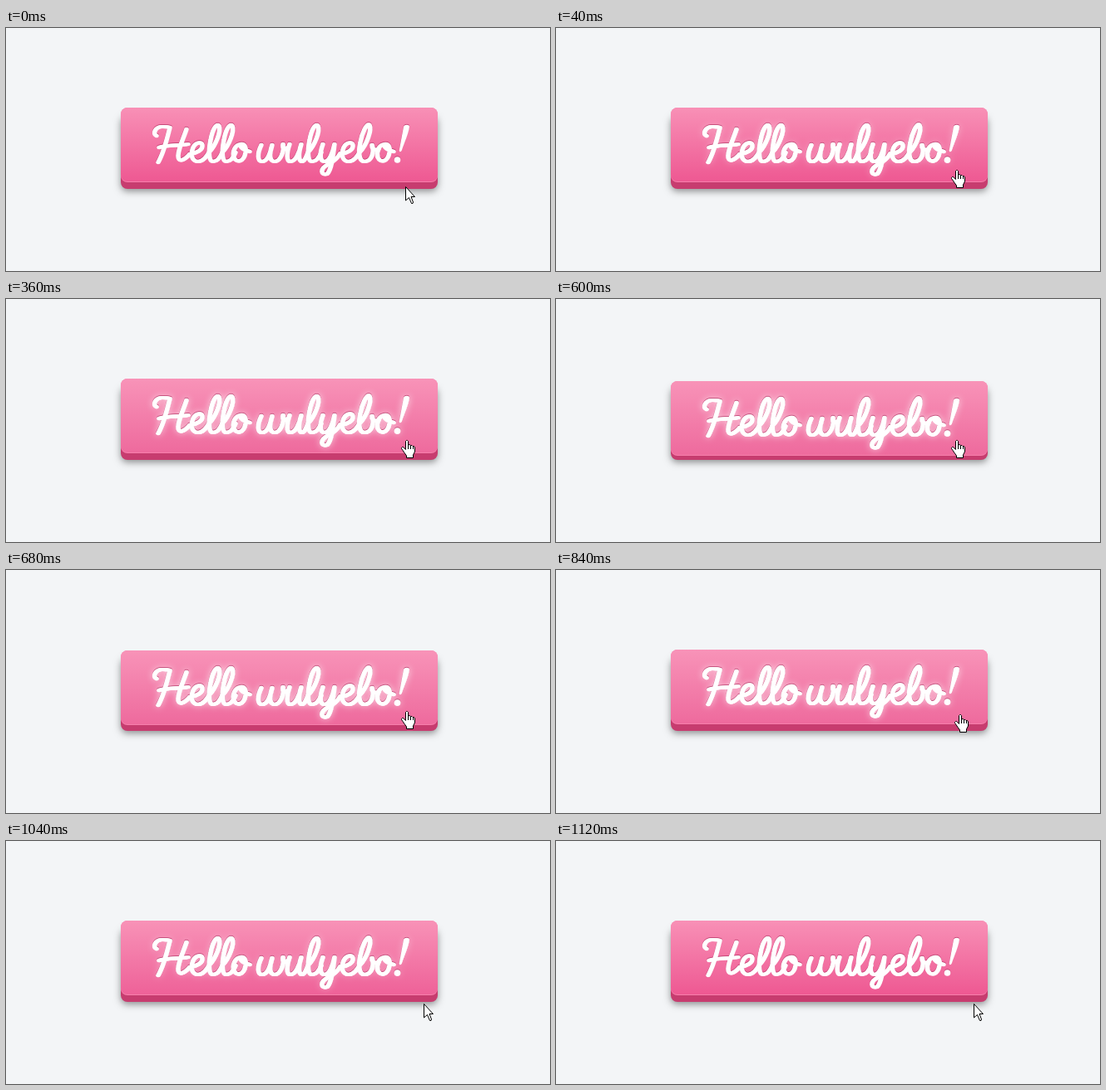
An HTML page with a canvas that plays this animation: 654 by 293 pixels, repeating every 1280 ms.

```html
<!DOCTYPE html>
<html lang="en">
<head>
<meta charset="utf-8">
<title>Hello button</title>
<style>
html, body { margin: 0; width: 100%; height: 100%; overflow: hidden; background: #f3f5f7; }
canvas { display: block; width: 654px; height: 293px; }
</style>
</head>
<body>
<canvas id="stage" width="654" height="293" role="img" aria-label="Hello wulyebo!"></canvas>
<script>
const W = 654, H = 293, LOOP = 1280;
const ctx = document.getElementById('stage').getContext('2d');

// Button states: start time, pointer, position, press depth, glow, hover tint
const states = [
  [0, 'arrow', 480, 191, 0, 0, 0],
  [40, 'hand', 475, 171, 0, 0.5, 0],
  [120, 'hand', 475, 171, 0, 1, 0],
  [280, 'hand', 475, 170, 0, 1, 0.5],
  [360, 'hand', 475, 170, 0, 1, 1],
  [600, 'hand', 475, 170, 3, 1, 1],
  [680, 'hand', 475, 170, 1, 1, 1],
  [840, 'hand', 479, 174, 0, 1, 1],
  [920, 'hand', 489, 185, 0, 1, 1],
  [1040, 'arrow', 502, 196, 0, 0.5, 0.5],
  [1120, 'arrow', 502, 196, 0, 0, 0]
];

// Script letters as pen strokes
const pen = {
  H: 'M181 130C176 128 179 119 188 119C192 119 195 119 197 120C194 132 190 150 183 162' +
     'M217 122C213 134 207 146 207 154C207 162 213 161 221 152M184 144C194 141 208 142 219 140',
  e: 'M221 152C229 151 237 147 236 141C235 136 226 138 224 147C222 156 225 161 231 161C237 161 242 154 244 150',
  l: 'M244 150C252 142 259 124 256 118C253 114 248 123 246 135C243 150 244 161 249 161C254 161 258 155 260 150',
  o: 'M283 140C275 140 272 150 274 156C277 163 286 162 288 150C289 143 286 139 282 140C281 145 287 147 293 149',
  w: 'M307 141C302 151 302 161 308 161C314 161 318 150 320 141C316 153 317 161 323 161' +
     'C330 161 335 148 333 140C332 146 335 147 339 144',
  u: 'M341 140C337 151 337 161 342 161C348 161 353 150 355 140C351 152 352 161 356 161C359 161 361 155 363 150',
  y: 'M381 140C377 151 377 161 383 161C389 161 393 150 395 140C393 156 391 172 386 176' +
     'C379 178 376 170 388 164C395 161 399 156 402 151',
  b: 'M425 150C434 141 440 122 437 117C434 114 428 126 426 138C423 152 425 161 431 161' +
     'C440 161 443 149 440 141C440 147 444 148 448 146'
};
const word = [['H', 0], ['e', 0], ['l', 0], ['l', 16], ['o', 0],
  ['w', 0], ['u', 0], ['l', 119], ['y', 0], ['e', 181], ['b', 0], ['o', 173]];

function makeLabel() {
  const layer = document.createElement('canvas');
  layer.width = W;
  layer.height = H;
  const g = layer.getContext('2d');
  g.strokeStyle = g.fillStyle = '#fff';
  g.lineWidth = 4.2;
  g.lineCap = g.lineJoin = 'round';
  for (const [ch, x] of word) {
    const path = new Path2D(pen[ch]);
    for (const nib of [-0.7, 0.7]) {
      g.setTransform(1, 0, 0, 1, x + nib, 0);
      g.stroke(path);
    }
  }
  g.setTransform(1, 0, 0, 1, 0, 0);
  g.fill(new Path2D('M478 119C479 116 485 116 485 119C484 127 479 138 476 147C475 150 472 150 473 146Z'));
  g.beginPath();
  g.arc(470.5, 159, 3.8, 0, 7);
  g.fill();
  return layer;
}
const label = makeLabel();

const pointers = {
  arrow: [new Path2D('M.5 .5V17L4.5 13.5L7.5 20.5H9L9.5 19L7 12.5H11.5Z'), new Path2D()],
  hand: [
    new Path2D('M5.5 1.5L6.5 .5H7.5L8.5 1.5V6L10 5.5L11.5 6.5H13L14 7.5H15.5L16.5 9V14L14.5 18V21.5' +
      'H6.5V19L4 15.5L2 12.5L.5 10.5V9.5L1.5 8.5H2.5L5.5 11.5Z'),
    new Path2D('M8.5 6V11M11.5 7V11M14.5 8V11')
  ]
};

function drawPointer(kind, x, y) {
  const [shape, lines] = pointers[kind];
  ctx.save();
  ctx.translate(x, y);
  ctx.fillStyle = '#fff';
  ctx.strokeStyle = '#000';
  ctx.lineWidth = 1;
  ctx.fill(shape);
  ctx.stroke(shape);
  ctx.stroke(lines);
  ctx.restore();
}

function box(y, h) {
  ctx.beginPath();
  ctx.roundRect(138, y, 381, h, 8);
}

function withShadow(color, blur, dy, draw) {
  ctx.save();
  ctx.shadowColor = color;
  ctx.shadowBlur = blur;
  ctx.shadowOffsetY = dy;
  draw();
  ctx.restore();
}

const mix = (a, b, t) => `rgb(${a.map((v, i) => Math.round(v + (b[i] - v) * t))})`;

function drawButton(press, glow, hover) {
  const top = 96 + press;
  withShadow('rgba(0,0,0,.42)', 8, 3, () => {
    ctx.fillStyle = '#c73c6f';
    box(104, 90);
    ctx.fill();
  });

  const fade = ctx.createLinearGradient(0, top, 0, top + 90);
  fade.addColorStop(0, mix([248, 144, 182], [248, 147, 184], hover));
  fade.addColorStop(1, mix([238, 88, 146], [238, 106, 157], hover));
  ctx.fillStyle = '#f67fab';
  box(top, 90);
  ctx.fill();
  ctx.fillStyle = fade;
  box(top, 89);
  ctx.fill();

  const text = () => ctx.drawImage(label, 0, press);
  if (glow) withShadow(`rgba(255,255,255,${0.65 * glow})`, 8, 0, text);
  withShadow('rgba(180,50,100,.7)', 1.5, -1, text);
}

function frame(now) {
  const t = now % LOOP;
  const [, kind, x, y, press, glow, hover] = states.findLast(s => s[0] <= t);
  ctx.fillStyle = '#f3f5f7';
  ctx.fillRect(0, 0, W, H);
  drawButton(press, glow, hover);
  drawPointer(kind, x, y);
}

const start = performance.now();
function tick() {
  frame(performance.now() - start);
  requestAnimationFrame(tick);
}
tick();
</script>
</body>
</html>
```
